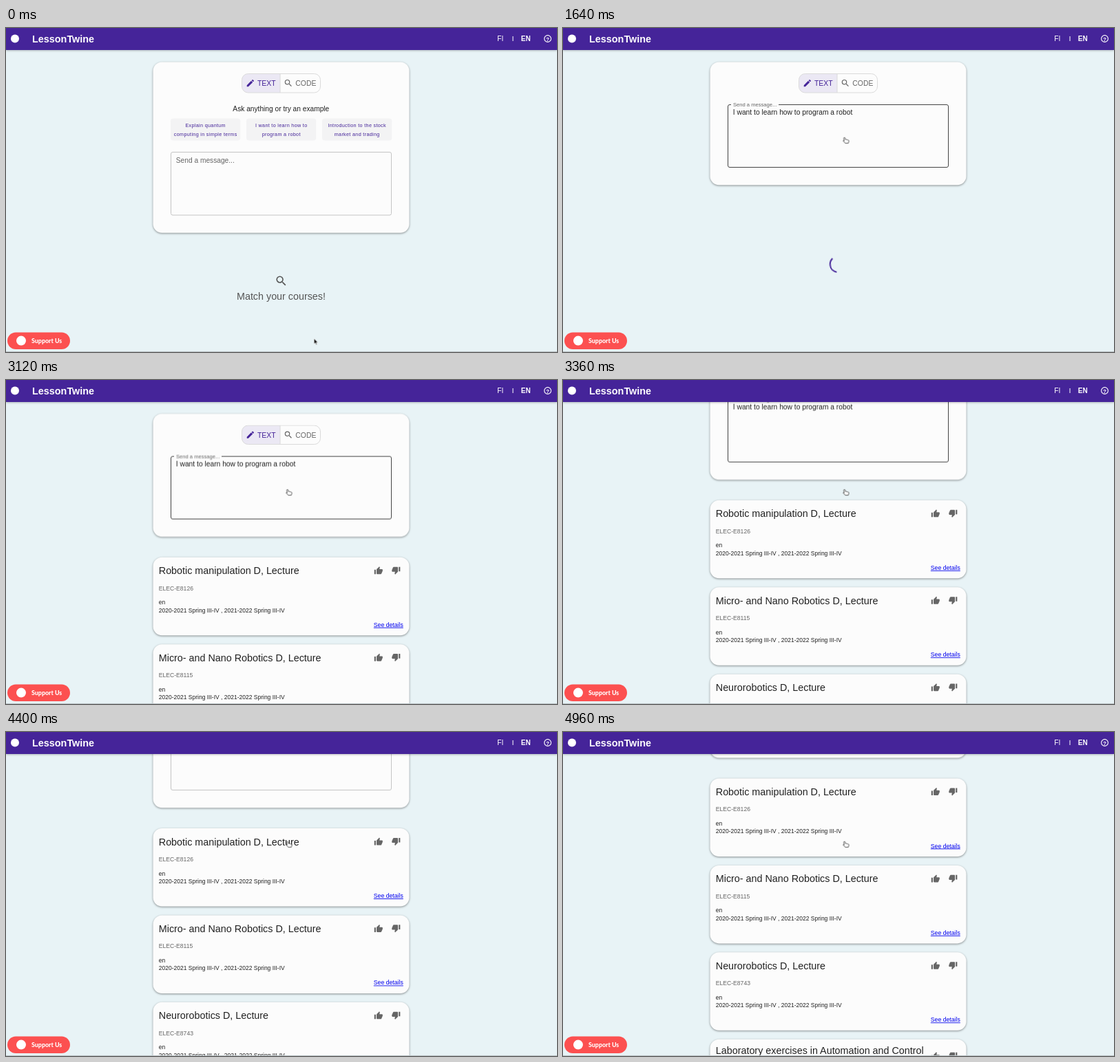
An HTML page that plays this animation: 800x471 px, repeating every 5 s.

```html
<!DOCTYPE html>
<html lang="en">
<head>
<meta charset="utf-8">
<title>LessonTwine</title>
<style>
  html, body { margin: 0; width: 100%; height: 100%; overflow: hidden; background: #e8f3f6; }
  svg { display: block; width: 100vw; height: 100vh; }
  text { font-family: "Liberation Sans", Arial, sans-serif; fill: #212121; white-space: pre; }

  .sheet { fill: #fcfcfc; filter: drop-shadow(0 1.5px 1.8px rgba(0, 0, 0, .42)); }
  .purple { fill: #452499; }
  .grey { fill: #666; }
  .mid { text-anchor: middle; }
  .white { fill: #fff; }
  .body { font-size: 10.2px; }
  .toggle { font-size: 10.4px; }
  .title { font-size: 14.34px; }
  .small { font-size: 8.5px; }
  .link { font-size: 8.7px; fill: #00e; text-decoration: underline; text-anchor: end; }
  .chip { fill: #f3f3f4; }
  .chip-text { font-size: 7.2px; letter-spacing: .33px; fill: #452499; text-anchor: middle; }
  .field { fill: none; stroke: #c4c4c4; }

  /* One shared 5 s timeline: 1% = 50 ms */
  .home, .form, .loading, .results, .field, .chip-hover,
  .arrow, .beam, .hand, .scroll, .pointer, .label, .spin, .dash {
    animation: 5s linear infinite;
  }
  .home, .form, .loading, .results, .field, .chip-hover, .arrow, .beam, .hand {
    animation-timing-function: step-end;
  }
  .home { animation-name: home; }
  .form { animation-name: form; }
  .loading { animation-name: loading; }
  .results { animation-name: results; }
  .home .field { animation-name: field-home; }
  .form .field { animation-name: field-form; }
  .chip-hover { animation-name: chip; }
  .arrow { animation-name: arrow; }
  .beam { animation-name: beam; }
  .hand { animation-name: hand; }
  .scroll { animation-name: scroll; }
  .pointer { animation-name: pointer; }
  .label { animation-name: label; }
  .spin { animation-name: spin; }
  .dash { animation-name: dash; }

  @keyframes home { 0% { opacity: 1 } 26.4%, 100% { opacity: 0 } }
  @keyframes form { 0% { opacity: 0 } 26.4%, 100% { opacity: 1 } }
  @keyframes loading { 0% { opacity: 0 } 26.4% { opacity: 1 } 52%, 100% { opacity: 0 } }
  @keyframes results { 0% { opacity: 0 } 52%, 100% { opacity: 1 } }
  @keyframes field-home { 0% { stroke: #c4c4c4 } 10.4% { stroke: #444 } 14.4%, 100% { stroke: #c4c4c4 } }
  @keyframes field-form { 0% { stroke: #444 } 73.6%, 100% { stroke: #c4c4c4 } }
  @keyframes chip { 0% { fill: #f3f3f4 } 16%, 100% { fill: #f3f1f9 } }
  @keyframes arrow { 0% { opacity: 1 } 10.4% { opacity: 0 } 14.4% { opacity: 1 } 16%, 100% { opacity: 0 } }
  @keyframes beam { 0% { opacity: 0 } 10.4% { opacity: 1 } 14.4%, 100% { opacity: 0 } }
  @keyframes hand { 0% { opacity: 0 } 16%, 100% { opacity: 1 } }

  @keyframes pointer {
    0%, 1.6% { transform: translate(447.3px, 451.5px); animation-timing-function: ease-in-out; }
    16.8%, 100% { transform: translate(408.6px, 158.8px); }
  }
  @keyframes scroll {
    0%, 62.4% { transform: translateY(0); animation-timing-function: cubic-bezier(.46, 1, .84, 1); }
    73.6%, 88% { transform: translateY(-118px); animation-timing-function: cubic-bezier(.3, .3, .5, 1); }
    98.4%, 100% { transform: translateY(-190.7px); }
  }
  @keyframes label {
    0%, 26.4% { transform: translate(247px, 126px) scale(1.34); animation-timing-function: cubic-bezier(0, 0, .2, 1); }
    30.4%, 100% { transform: translate(247px, 114.3px) scale(1); }
  }
  @keyframes spin {
    0%, 26.4% { transform: rotate(0deg) }
    54.4%, 100% { transform: rotate(360deg) }
  }
  @keyframes dash {
    0%, 26.4% { stroke-dasharray: 1 200; stroke-dashoffset: 0; animation-timing-function: ease-in-out; }
    40.4% { stroke-dasharray: 100 200; stroke-dashoffset: -15; animation-timing-function: ease-in-out; }
    54.4%, 100% { stroke-dasharray: 100 200; stroke-dashoffset: -125; }
  }
</style>
</head>
<body>
<svg viewBox="0 0 800 471" preserveAspectRatio="none">
  <defs>
    <path id="lens" d="M15.5 14h-.79l-.28-.27A6.47 6.47 0 0 0 16 9.5 6.5 6.5 0 1 0 9.5 16c1.61 0 3.09-.59 4.23-1.57l.27.28v.79l5 4.99L20.49 19l-4.99-5zm-6 0C7.01 14 5 11.99 5 9.5S7.01 5 9.5 5 14 7.01 14 9.5 11.99 14 9.5 14z"/>
    <path id="pencil" d="M3 17.25V21h3.75L17.81 9.94l-3.75-3.75L3 17.25zM20.71 7.04a1 1 0 0 0 0-1.41l-2.34-2.34a1 1 0 0 0-1.41 0l-1.83 1.83 3.75 3.75 1.83-1.83z"/>
    <path id="thumb" transform="scale(.55) translate(-12 -11)" d="M1 21h4V9H1v12zm22-11c0-1.1-.9-2-2-2h-6.31l.95-4.57.03-.32c0-.41-.17-.79-.44-1.06L14.17 1 7.59 7.59C7.22 7.95 7 8.45 7 9v10c0 1.1.9 2 2 2h9c.83 0 1.54-.5 1.84-1.22l3.02-7.05c.09-.23.14-.47.14-.73v-2z"/>
  </defs>

  <rect width="800" height="471" fill="#e8f3f6"/>

  <g class="scroll">
    <g class="home">
      <rect class="sheet" x="213.5" y="49.5" width="372" height="248.3" rx="13"/>
      <text class="body mid" x="399.3" y="121">Ask anything or try an example</text>
      <g id="chips"></g>
      <rect class="field" x="239.5" y="180.5" width="320" height="91.5" rx="2.5"/>
      <text class="body grey" x="246.8" y="196">Send a message...</text>
      <use href="#lens" class="grey" transform="translate(390 358) scale(.8)" style="fill:#555"/>
      <text class="title mid" x="399.5" y="394.7" style="fill:#555">Match your courses!</text>
    </g>

    <g class="form">
      <rect class="sheet" x="213.5" y="49.5" width="372" height="178.7" rx="13"/>
      <path class="field" d="M244 111.5H242a2.5 2.5 0 0 0-2.5 2.5V200a2.5 2.5 0 0 0 2.5 2.5H557a2.5 2.5 0 0 0 2.5-2.5V114a2.5 2.5 0 0 0-2.5-2.5H313"/>
      <text class="label grey" font-size="7.6">Send a message...</text>
      <text x="246.8" y="126.3" font-size="10.28">I want to learn how to program a robot</text>
    </g>

    <path d="M398 66.5H351.5a9 9 0 0 0-9 9v9.5a9 9 0 0 0 9 9H398z" fill="#ebe8f4"/>
    <path d="M398 66.5V94" stroke="#dadada"/>
    <rect x="342.5" y="66.5" width="114" height="27.5" rx="9" fill="none" stroke="#dadada"/>
    <use href="#pencil" class="purple" transform="translate(348 73.3) scale(.57)"/>
    <text class="toggle purple" x="365" y="84">TEXT</text>
    <use href="#lens" class="grey" transform="translate(403 73.2) scale(.58)"/>
    <text class="toggle grey" x="420.3" y="84">CODE</text>

    <g class="results" id="results"></g>
  </g>

  <g class="loading">
    <g transform="translate(399.5 343.3) scale(.582)">
      <g class="spin"><circle class="dash" r="20.2" fill="none" stroke="#452499" stroke-width="3.6"/></g>
    </g>
  </g>

  <rect class="purple" width="800" height="32" style="filter:drop-shadow(0 1px 1.5px rgba(0,0,0,.25))"/>
  <circle class="white" cx="13" cy="15.5" r="6"/>
  <text class="white" x="38" y="20.6" font-size="14.4" font-weight="700">LessonTwine</text>
  <text class="white" x="713.3" y="19.2" font-size="10.2">FI</text>
  <path d="M736 12v7" stroke="#fff"/>
  <text class="white" x="747.8" y="19.2" font-size="10" font-weight="700">EN</text>
  <circle cx="786.5" cy="15.5" r="4.9" fill="none" stroke="#fff" stroke-width="1.1"/>
  <text class="white mid" x="786.5" y="18.5" font-size="8" font-weight="700">?</text>

  <path d="M0 470.5H800" stroke="#b9c2c5"/>
  <rect x="2" y="442.5" width="91" height="24.5" rx="12.25" fill="#fc5050"/>
  <circle class="white" cx="22" cy="454.6" r="7"/>
  <text class="white" x="37" y="457.7" font-size="8.9" font-weight="800" style="font-family:Lato,sans-serif">Support Us</text>

  <g class="pointer">
    <path class="arrow" d="M0 0V7.8L1.8 6.1 3 8.9 4.3 8.4 3.1 5.7H5.5Z" fill="#111" stroke="#fff" stroke-width=".6"/>
    <path class="beam" d="M-1.5-4.5H1.5M0-4.5V4.5M-1.5 4.5H1.5" fill="none" stroke="#333" stroke-width=".9"/>
    <path class="hand" d="M0 .3C.9.3 1 1.1 1.2 1.9l.4 1.4c1-.4 1.6 0 1.9.4.8-.3 1.4 0 1.7.5.9-.1 1.3.4 1.2 1.3-.1 1.4-.6 2-.8 3.2H1.2C.6 7.4-1 6.6-1.8 5.4c-.2-.7.6-1 1.4-.2L-.9 1.6C-1 .9-.7.3 0 .3Z" fill="#fff" stroke="#333" stroke-width=".85"/>
  </g>
</svg>
<script>
  const examples = [
    ["Explain quantum", "computing in simple terms"],
    ["I want to learn how to", "program a robot"],
    ["Introduction to the stock", "market and trading"],
  ];
  const courses = [
    { title: ["Robotic manipulation D, Lecture"], code: "ELEC-E8126" },
    { title: ["Micro- and Nano Robotics D, Lecture"], code: "ELEC-E8115" },
    { title: ["Neurorobotics D, Lecture"], code: "ELEC-E8743" },
    { title: ["Laboratory exercises in Automation and Control"], code: "", wrapped: true },
  ];

  const chip = ([first, second], i) => {
    const x = 239 + i * 110;
    return `<rect class="chip ${i === 1 ? "chip-hover" : ""}" x="${x}" y="131.5" width="101.3" height="32" rx="4"/>
      <text class="chip-text" x="${x + 50.7}" y="144">${first}</text>
      <text class="chip-text" x="${x + 50.7}" y="156.7">${second}</text>`;
  };

  const card = ({ title, code, wrapped }, i) => {
    const iconY = wrapped ? 24.5 : 19.4;
    return `<g transform="translate(213.5 ${258.2 + i * 126.4})">
      <rect class="sheet" width="372" height="113.5" rx="13"/>
      <text class="title" x="8.3" y="${wrapped ? 21.8 : 24.5}">${title}</text>
      <use href="#thumb" class="grey" transform="translate(327.3 ${iconY - .4})"/>
      <use href="#thumb" class="grey" transform="translate(352.8 ${iconY}) rotate(180)"/>
      ${wrapped ? "" : `<text class="grey" x="8.3" y="47.9" font-size="8.6">${code}</text>
      <text class="small" x="8.3" y="68.6">en</text>
      <text class="small" x="8.3" y="79.9">2020-2021 Spring III-IV , 2021-2022 Spring III-IV</text>
      <text class="link" x="363.3" y="101">See details</text>`}
    </g>`;
  };

  document.getElementById("chips").innerHTML = examples.map(chip).join("");
  document.getElementById("results").innerHTML = courses.map(card).join("");
</script>
</body>
</html>
```
